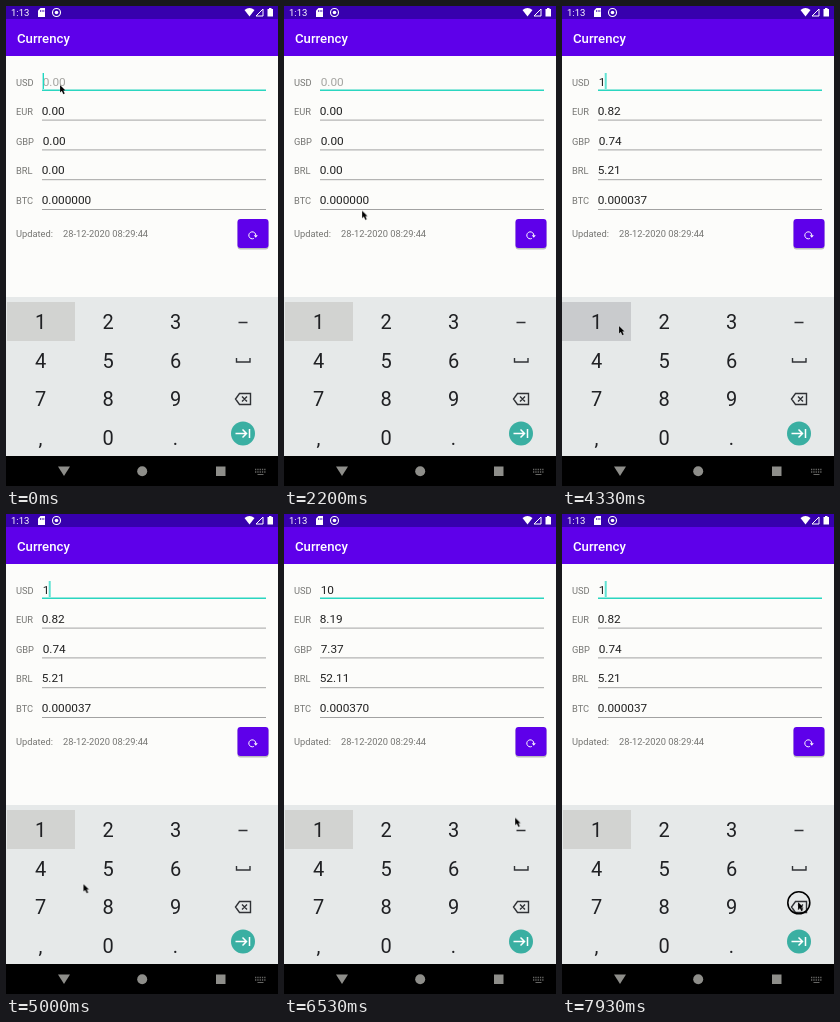
Animation of 272 by 480 pixels, one loop 8 s. Source, as an HTML page:

```html
<!DOCTYPE html>
<html lang="en">
<head>
<meta charset="utf-8">
<title>Currency</title>
<style>
html, body { margin: 0; width: 100%; height: 100%; overflow: hidden; background: #fcfcfa; }
svg { display: block; width: 272px; height: 480px; font-family: Roboto, "Noto Sans", sans-serif; }
.label { font-size: 9.3px; fill: #757572; }
.value { font-size: 11.8px; fill: #212121; }
.hint { fill: #a4a4a0; }
.digit { font-size: 20px; fill: #202124; text-anchor: middle; }
.line { fill: none; stroke: #303236; stroke-width: 1.4; }

.values, #caret, #ring { animation: 8s step-end infinite; }
#empty { animation-name: empty; }
#one { animation-name: one; }
#ten { animation-name: ten; }
#caret { animation-name: caret; }
#ring { animation-name: ring; }
.press { opacity: 0; fill: #c9cbcd; animation: 8s linear infinite; }
#press1 { animation-name: press1; }
#press0 { animation-name: press0; }
#pressDel { animation-name: pressDel; }
#pointer { animation: move 8s linear infinite; }

@keyframes empty { 0% { visibility: visible } 49.1%, 100% { visibility: hidden } }
@keyframes one {
  0% { visibility: hidden } 49.1% { visibility: visible }
  74.1% { visibility: hidden } 95%, 100% { visibility: visible }
}
@keyframes ten { 0% { visibility: hidden } 74.1% { visibility: visible } 95%, 100% { visibility: hidden } }
@keyframes caret {
  0% { opacity: 1; transform: none }
  .87% { opacity: 0 } 7.5% { opacity: 1 }
  14.1% { opacity: 0 } 20% { opacity: 1 }
  25.8% { opacity: 0 } 32.5% { opacity: 1 }
  38.3% { opacity: 0 } 45% { opacity: 1; transform: none }
  49.1% { opacity: 1; transform: translateX(6.5px) }
  55.8% { opacity: 0 } 61.6% { opacity: 1 }
  67.5% { opacity: 0; transform: translateX(6.5px) }
  74.1% { opacity: 1; transform: translateX(13px) }
  80% { opacity: 0 } 86.6% { opacity: 1 }
  92.5% { opacity: 0; transform: translateX(13px) }
  95%, 100% { opacity: 1; transform: translateX(6.5px) }
}
@keyframes ring {
  0% { opacity: 0 }
  45% { opacity: 1 } 47.4% { opacity: 0 }
  69.9% { opacity: 1 } 72.4% { opacity: 0 }
  92.4% { opacity: 1 } 94.9% { opacity: 0 }
  98.3%, 100% { opacity: 1 }
}
@keyframes press1 { 0%, 46.5% { opacity: 0 } 49%, 54.5% { opacity: 1 } 58%, 100% { opacity: 0 } }
@keyframes press0 { 0%, 71.2% { opacity: 0 } 73%, 75% { opacity: 1 } 78%, 100% { opacity: 0 } }
@keyframes pressDel { 0%, 92.4% { opacity: 0 } 93.4%, 94.4% { opacity: 1 } 95.9%, 100% { opacity: 0 } }
@keyframes move {
  0%, .5% { transform: translate(54px, 79px) }
  3.5% { transform: translate(57px, 125px) }
  7.5% { transform: translate(52px, 240px) }
  10.8% { transform: translate(40px, 322px) }
  12.5% { transform: translate(32px, 319px) }
  14.1%, 24.5% { transform: translate(33px, 317px) }
  26% { transform: translate(55px, 263px) }
  27.5% { transform: translate(78px, 205px) }
  30% { transform: translate(84px, 142px) }
  33% { transform: translate(82px, 122px) }
  36% { transform: translate(76px, 182px) }
  40% { transform: translate(54px, 288px) }
  43.4% { transform: translate(40px, 323px) }
  45%, 48% { transform: translate(44px, 328px) }
  51% { transform: translate(54px, 321px) }
  54.1%, 57.5% { transform: translate(57px, 320px) }
  62% { transform: translate(75px, 365px) }
  67.5% { transform: translate(101px, 419px) }
  69.5%, 73% { transform: translate(104px, 428px) }
  75.5% { transform: translate(150px, 386px) }
  78.4% { transform: translate(225px, 312px) }
  81.6% { transform: translate(231px, 303px) }
  84.5% { transform: translate(236px, 355px) }
  87% { transform: translate(239px, 412px) }
  89.1%, 90.8% { transform: translate(238px, 403px) }
  92.4%, 100% { transform: translate(236px, 388px) }
}
</style>
</head>
<body>
<svg viewBox="0 0 272 480">
  <rect width="272" height="480" fill="#fcfcfa"/>
  <rect width="272" height="14" fill="#3700ae"/>
  <rect y="13" width="272" height="37" fill="#5e00ea"/>
  <text x="11" y="37" font-size="13.2" font-weight="500" fill="#fff">Currency</text>

  <g id="status" fill="#fff">
    <text x="5" y="10" font-size="9.5">1:13</text>
    <path d="M34.5 2H39V11H32V4.5Z"/>
    <path d="M34.5 4v2M36.2 4v2M37.8 4v2" stroke="#3700ae" stroke-width=".7"/>
    <circle cx="50.5" cy="6.5" r="4" fill="none" stroke="#fff" stroke-width="1.1"/>
    <circle cx="50.5" cy="6.5" r="1.8"/>
    <path d="M238.5 4Q243.5 0 248.5 4L243.5 10.5Z"/>
    <path d="M257 3V10H250Z" fill="none" stroke="#fff"/>
    <path d="M261.5 3H263V2H265.5V3H267V10.5H261.5Z"/>
  </g>

  <g id="form"></g>
  <g class="values" id="empty"></g>
  <g class="values" id="one"></g>
  <g class="values" id="ten"></g>
  <rect id="caret" x="36.6" y="67" width="1.4" height="16" fill="#1fd8c2"/>

  <text class="label" x="10" y="231">Updated:</text>
  <text class="label" x="57" y="231">28-12-2020 08:29:44</text>
  <rect x="231.5" y="214" width="31" height="29.5" rx="3" fill="#bcbcbc"/>
  <rect x="231.5" y="213" width="31" height="29" rx="3" fill="#5e00ea"/>
  <path d="M247.8 232.5A3.5 3.5 0 1 1 249.8 229.4" fill="none" stroke="#fff"/>
  <path d="M247.8 229.2H251.8L249.8 231.8Z" fill="#fff"/>

  <rect y="291" width="272" height="159" fill="#e6e9e9"/>
  <rect x="1" y="296" width="68" height="39" fill="#d2d3d1"/>
  <rect class="press" id="press1" x="0" y="296" width="69" height="39"/>
  <rect class="press" id="press0" x="68" y="411" width="68" height="39"/>
  <rect class="press" id="pressDel" x="203" y="373" width="69" height="39"/>
  <g id="keys"></g>
  <path class="line" d="M232.500 316.500H241.500M230.500 352V356H244V352"/>
  <path class="line" d="M233.500 387.500H244.500V398.500H233.500L229.500 393ZM236 390.500L241 395.500M241 390.500L236 395.500"/>
  <circle cx="237" cy="427.5" r="12" fill="#3aafa2"/>
  <path d="M229.500 427.500H240.500M236.500 423.500L240.500 427.500L236.500 431.500M243.500 423V432" fill="none" stroke="#fff" stroke-width="1.5"/>

  <rect y="450" width="272" height="30" fill="#000"/>
  <g id="nav" fill="#8e8e8a">
    <path d="M52 460.5H64L58 470Z"/>
    <circle cx="136.2" cy="465.3" r="5"/>
    <rect x="210" y="460.5" width="9.5" height="9.5"/>
    <path d="M249 463.5H260M249 466H260" fill="none" stroke="#666664" stroke-width="1.3" stroke-dasharray="1.3 1"/>
    <path d="M251.5 468.5H257.5" stroke="#666664"/>
  </g>

  <g id="pointer">
    <path d="M0 0V7.600L1.800 6.100L3.300 9.300L4.800 8.600L3.400 5.600H5.600Z" fill="#000" stroke="#fff" stroke-opacity=".4" stroke-width=".4"/>
    <circle id="ring" cx=".8" cy=".8" r="11" fill="none" stroke="#000" stroke-width="1.6"/>
  </g>
</svg>
<script>
const byId = id => document.getElementById(id);
const text = (x, y, cls, str) => `<text x="${x}" y="${y}" class="${cls}">${str}</text>`;
const rowY = i => Math.floor(80 + i * 29.6);
const codes = ['USD', 'EUR', 'GBP', 'BRL', 'BTC'];

byId('form').innerHTML = codes.map((code, i) => {
  const y = 84.3 + i * 29.8;
  const stroke = i ? '#8c8c8c' : '#2ad6c0';
  return text(10, rowY(i), 'label', code) +
    `<path d="M36 ${y}H260" stroke="${stroke}" stroke-width="${i ? 0.8 : 1.4}"/>`;
}).join('');

const amounts = {
  empty: ['0.00', '0.00', '0.00', '0.00', '0.000000'],
  one: ['1', '0.82', '0.74', '5.21', '0.000037'],
  ten: ['10', '8.19', '7.37', '52.11', '0.000370']
};
for (const [id, list] of Object.entries(amounts)) {
  byId(id).innerHTML = list.map((str, i) => {
    const cls = id === 'empty' && i === 0 ? 'value hint' : 'value';
    return text(i === 0 || i === 2 ? 36.7 : 35.7, rowY(i), cls, str);
  }).join('');
}

byId('keys').innerHTML = [...'123456789,0.'].map((key, i) =>
  text(34.5 + (i % 3) * 67.5, 323.3 + Math.floor(i / 3) * 38.4, 'digit', key)).join('');
</script>
</body>
</html>
```
